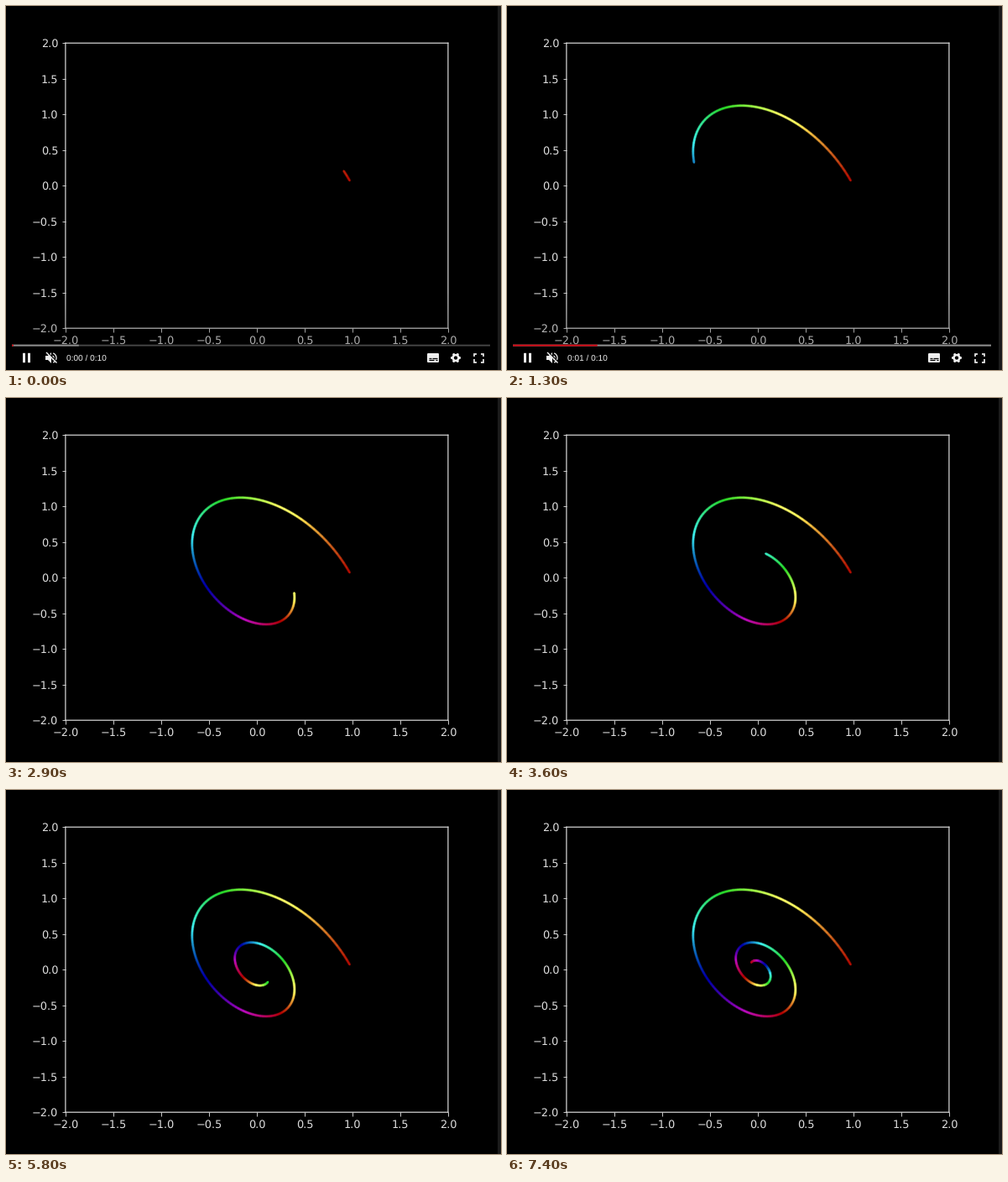
Write a matplotlib script that moves like this. It is 590 px wide and 434 px high and loops after 7500 ms.

```python
import numpy as np
import matplotlib.pyplot as plt
from matplotlib.animation import FuncAnimation
from matplotlib.collections import LineCollection
from matplotlib.colors import hsv_to_rgb
from matplotlib.patches import Circle, FancyBboxPatch, Polygon, Rectangle

W, H, DPI = 590, 434, 100
FRAMES, INTERVAL = 75, 100
PT = 72 / DPI  # points per pixel
INK = "#dcdcdc"
ICON = "#eeeeee"

STEP = 0.0491  # phase per sample
DECAY, SHEAR, RISE = 0.1717, 0.388, 1.449

plt.rcParams["font.family"] = "DejaVu Sans"
plt.rcParams["text.hinting"] = "none"
fig = plt.figure(figsize=(W / DPI, H / DPI), dpi=DPI, facecolor="black")

# Plot area
L, R, T, B = 70.9, 526.9, 44.2, 384.2
ax = fig.add_axes([L / W, 1 - B / H, (R - L) / W, (B - T) / H], facecolor="black")
ax.set(xlim=(-2, 2), ylim=(-2, 2))
ticks = np.arange(-2, 2.1, 0.5)
ax.set_xticks(ticks)
ax.set_yticks(ticks)
ax.tick_params(length=4.5 * PT, width=1.05 * PT, pad=4.2 * PT,
               labelsize=12.9 * PT, color="#c0c0c0", labelcolor=INK)
for spine in ax.spines.values():
    spine.set(color=INK, linewidth=1.2 * PT, snap=False)

# Soft halo under a narrower core
glow = LineCollection([], linewidths=3.6 * PT, capstyle="butt", alpha=0.4)
trail = LineCollection([], linewidths=2.2 * PT, capstyle="round")
ax.add_collection(glow)
ax.add_collection(trail)

# Player overlay in pixel coordinates
ui = fig.add_axes([0, 0, 1, 1])
ui.axis("off")
ui.add_patch(Rectangle((585.5, 0), 5, H, color="#1b1b1b", lw=0))
controls = []


def patch(p):
    controls.append(ui.add_patch(p))
    return p


def box(x, y, w, h, color=ICON):
    return patch(Rectangle((x, y), w, h, facecolor=color, lw=0, snap=False))


def stroke(xs, ys, width=1.6, color=ICON):
    controls.extend(ui.plot(xs, ys, color=color, lw=width * PT,
                            solid_capstyle="butt", solid_joinstyle="miter"))


shade = np.zeros((94, 1, 4))
shade[:, 0, 3] = np.linspace(0, 0.36, 94)
controls.append(ui.imshow(shade, extent=(0, 585, H, H - 94), aspect="auto"))
ui.set(xlim=(0, W), ylim=(H, 0))

box(7, 403.7, 570, 1.9, "#464646")
loaded = box(7, 403.7, 0, 1.9, "#8c8c8c")
played = box(7, 403.7, 0, 1.9, "#d0000c")

# Pause
box(20, 413.8, 3, 11.4)
box(26, 413.8, 3, 11.4)

# Muted speaker
patch(Polygon([(47, 417), (50, 417), (54, 413), (54, 426), (50, 422), (47, 422)],
              facecolor=ICON, lw=0))
arc = np.linspace(-1.2, 1.2, 20)
stroke(54 + 6 * np.cos(arc), 419.5 + 6 * np.sin(arc), 1.3)
stroke(54.5 + 2.5 * np.cos(arc), 419.5 + 2.5 * np.sin(arc), 1.3)
stroke([49, 61], [412.5, 424.5], 1.4, "black")
stroke([48, 60.5], [413, 425.5], 1.4)

clock = ui.text(72, 423, "", color=ICON, fontsize=10.1 * PT,
                family="Liberation Sans", va="baseline")
controls.append(clock)

# Captions
patch(FancyBboxPatch((503, 415), 12, 9, boxstyle="round,pad=1,rounding_size=1.2",
                     facecolor=ICON, lw=0))
for y, (a, b, c, d) in ((419.5, (504, 506.5, 508, 514)), (422.3, (504, 510, 511.5, 514))):
    stroke([a, b], [y, y], 1.3, "black")
    stroke([c, d], [y, y], 1.3, "black")

# Gear
th = np.linspace(0, 2 * np.pi, 145)
rad = 5.3 + 0.7 * np.tanh(3 * np.cos(6 * th))
patch(Polygon(np.column_stack([536 + rad * np.cos(th), 419.5 + rad * np.sin(th)]),
              facecolor=ICON, lw=0))
patch(Circle((536, 419.5), 2.1, facecolor="black", lw=0))

# Fullscreen corners
for sx in (-1, 1):
    for sy in (-1, 1):
        cx, cy = 563.5 + 5.7 * sx, 419.5 + 5 * sy
        stroke([cx - 3.5 * sx, cx, cx], [cy, cy, cy - 3.2 * sy], 1.7)


def spiral(i):
    p = i * STEP
    fall = np.exp(-DECAY * p)
    return np.column_stack([fall * (np.cos(p) - SHEAR * np.sin(p)),
                            RISE * fall * np.sin(p)])


def hues(i):
    """Cyclic rainbow with softened chroma and deeper dark hues."""
    rgb = hsv_to_rgb(np.column_stack([(i / 100) % 1, np.ones_like(i), np.ones_like(i)]))
    luma = rgb @ [[0.299], [0.587], [0.114]]
    return np.clip(1.25 * luma ** 1.5 + 0.7 * (rgb - luma), 0, 1)


def update(k):
    head = np.interp(k, [0, 13, 23, 36, 74], [3, 56.5, 96, 147, 299])
    i = np.append(np.arange(1, head), head)
    pts = spiral(i)
    segments = np.stack([pts[:-1], pts[1:]], axis=1)
    for line in (glow, trail):
        line.set_segments(segments)
        line.set_color(hues(i[:-1]))

    done = (k + 0.25) / FRAMES
    played.set_width(570 * done)
    loaded.set_width(570 * min(1, 0.14 + 0.2 * k))
    clock.set_text(f"0:{int(10 * done):02d} / 0:10")
    alpha = float(np.clip((22 - k) / 3, 0, 1))
    for c in controls:
        c.set_alpha(alpha)
        c.set_visible(alpha > 0)
    return [glow, trail, *controls]


anim = FuncAnimation(fig, update, frames=FRAMES, interval=INTERVAL,
                     repeat=True, repeat_delay=0, blit=False)
plt.show()
```
